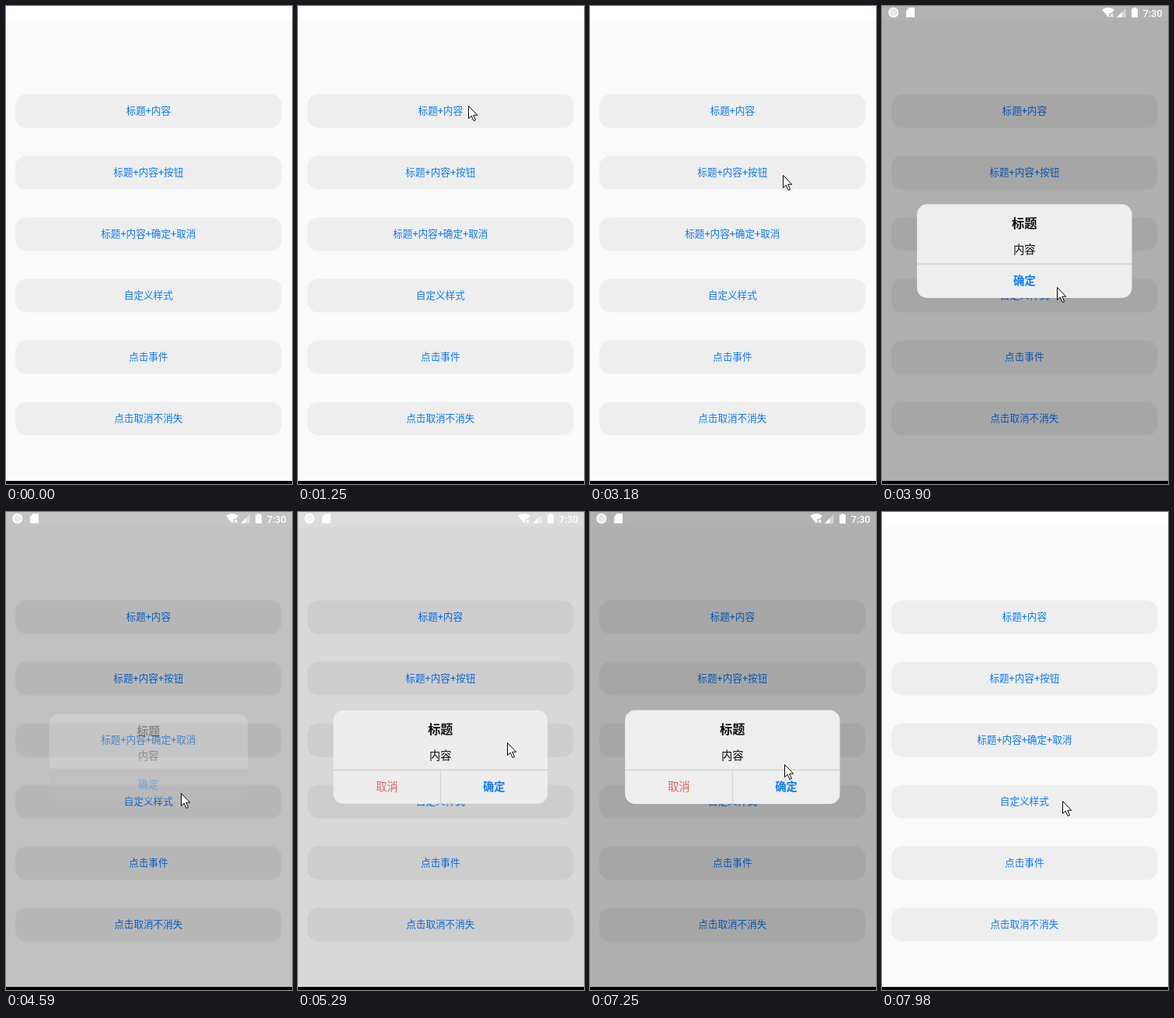
Write an HTML page with a canvas that moves like this. It is 368x614 px and loops after 8 s.

```html
<!DOCTYPE html>
<html lang="zh-CN">
<head>
<meta charset="utf-8">
<style>
  html, body { margin: 0; width: 100%; height: 100%; overflow: hidden; background: #fafafa; }
  canvas { display: block; width: 368px; height: 614px; }
</style>
</head>
<body>
<canvas id="stage"></canvas>
<script>
const W = 368, H = 614, LOOP = 8000, CX = 183.3, CY = 314.8;
const PRESS = 130, DIM = 0.3, DIM_TIME = 235, SCALE_TIME = 220, FADE_TIME = 150;
const FONT = 'Roboto, "Noto Sans CJK SC", "Noto Sans CJK", sans-serif';
const BLUE = '#0a7aff', RED = '#e0665c', INK = '#0c0c0c';
const LABELS = ['标题+内容', '标题+内容+按钮', '标题+内容+确定+取消', '自定义样式', '点击事件', '点击取消不消失'];

const dialog = (open, close, hit, ...actions) => ({ open, close, hit, actions });
const DIALOGS = [
  dialog(1255, 2335),
  dialog(3345, 4537, '确定', '确定'),
  dialog(5184, 5900, '取消', '取消', '确定'),
  dialog(6695, 7630, '确定', '取消', '确定')
];

// The pointer rests between moves
const move = (from, to, x, y) => ({ from, to, x, y });
const MOVES = [
  move(0, 50, 353, 614),
  move(50, 160, 340, 439),
  move(360, 1010, 219, 128),
  move(1890, 2260, 213, 424),
  move(2340, 2680, 225, 389),
  move(2700, 3170, 248, 217),
  move(3600, 3900, 225, 361),
  move(4970, 5140, 269, 296),
  move(5420, 5740, 112, 350),
  move(6110, 6370, 248, 282),
  move(6930, 7480, 252, 349),
  move(7640, 7970, 232, 371)
];

const ARROW = new Path2D('M0 0V16L3.7 12.6L6.6 19L9 18L6.2 11.7H11.2Z');
const CARD = new Path2D('M35 2h7v12.5h-11v-8.5z');
const WIFI = new Path2D('M291 14.5L283 4.8Q291 -.8 299 4.8L295.8 8.7H292.2V13z');
const CROSS = new Path2D('M293.5 10l4 4m0 -4l-4 4');

const dpr = window.devicePixelRatio || 1;
const stage = document.getElementById('stage');
const layer = document.createElement('canvas');
for (const c of [stage, layer]) {
  c.width = W * dpr;
  c.height = H * dpr;
}
const g = stage.getContext('2d'), lg = layer.getContext('2d');

const clamp = v => Math.max(0, Math.min(1, v));
const decelerate = (v, power) => 1 - Math.pow(1 - clamp(v), power);
const smooth = v => v * v * (3 - 2 * v);

function rect(c, x, y, w, h, color) {
  c.fillStyle = color;
  c.fillRect(x, y, w, h);
}

function card(c, x, y, w, h, r, color) {
  c.beginPath();
  c.roundRect(x, y, w, h, r);
  c.fillStyle = color;
  c.fill();
}

function circle(x, y, r) {
  g.beginPath();
  g.arc(x, y, r, 0, 7);
}

function signal(size) {
  g.beginPath();
  g.moveTo(302, 14.5);
  g.lineTo(302 + size, 14.5 - size);
  g.lineTo(302 + size, 14.5);
  g.fill();
}

// Text centred on x, with its middle at y
function label(c, text, x, y, size, color, weight = 400) {
  c.font = `${weight} ${size}px ${FONT}`;
  c.textAlign = 'center';
  c.fillStyle = color;
  c.fillText(text, x, y + size * 0.35);
}

function drawPage() {
  rect(g, 0, 0, W, H, '#fafafa');
  rect(g, 0, 0, W, 19, '#fff');
  LABELS.forEach((text, i) => {
    const y = 135 + i * 79;
    card(g, 12, y - 21.5, 342.5, 43, 14, '#eee');
    label(g, text, CX, y, 12.6, BLUE);
  });
}

function drawStatus() {
  g.fillStyle = g.strokeStyle = '#fff';
  g.lineWidth = 2.2;
  circle(14.8, 8.3, 5.4);
  g.stroke();
  g.globalAlpha = 0.7;
  circle(14.8, 8.3, 4);
  g.fill();
  g.globalAlpha = 0.45;
  signal(11.5);
  g.globalAlpha = 1;
  signal(6.5);
  g.fill(CARD);
  g.fill(WIFI);
  g.lineWidth = 1.1;
  g.stroke(CROSS);
  card(g, 321, 3.3, 8, 11.4, 0.8, '#fff');
  g.fillRect(323.2, 2, 3.6, 2);
  label(g, '7:30', 348.2, 9.2, 12.6, '#fff', 500);
}

function drawDialog(d, t, scale, alpha) {
  const n = d.actions.length, w = 276.5, h = n ? 120.4 : 76.4;
  const x = CX - w / 2, y = CY - h / 2, bar = y + 76.2, cell = w / n;
  const c = lg;
  c.setTransform(dpr, 0, 0, dpr, 0, 0);
  c.clearRect(0, 0, W, H);
  c.save();
  c.translate(CX, CY);
  c.scale(scale, scale);
  c.translate(-CX, -CY);
  card(c, x, y, w, h, 13, '#eee');
  c.clip();
  label(c, '标题', CX, y + 24.5, 16.2, INK, 700);
  label(c, '内容', CX, y + 58.3, 14.3, INK);
  d.actions.forEach((text, i) => {
    const left = x + i * cell, cancel = text === '取消';
    if (text === d.hit && t >= d.close - PRESS) rect(c, left, bar, cell, h, '#bec2be');
    label(c, text, left + cell / 2, y + 98.6, 14.3, cancel ? RED : BLUE, cancel ? 400 : 700);
    if (i) rect(c, left - 0.4, bar, 0.8, h, '#ccc');
  });
  if (n) rect(c, x, bar, w, 1, '#c8c8c8');
  c.restore();

  g.globalAlpha = alpha;
  g.drawImage(layer, 0, 0, W, H);
  g.globalAlpha = 1;
}

function drawPointer(t) {
  let x = 0, y = 0;
  for (const m of MOVES) {
    const k = smooth(clamp((t - m.from) / (m.to - m.from)));
    x += (m.x - x) * k;
    y += (m.y - y) * k;
  }
  if (t < MOVES[0].to) return;
  g.save();
  g.translate(Math.round(x) + 0.5, Math.round(y) + 0.5);
  g.fillStyle = '#fff';
  g.strokeStyle = '#000';
  g.lineWidth = 1;
  g.fill(ARROW);
  g.stroke(ARROW);
  g.restore();
}

function draw(t) {
  g.setTransform(dpr, 0, 0, dpr, 0, 0);
  drawPage();
  const d = DIALOGS.find(d => t >= d.open && t < d.close + DIM_TIME);
  if (d) {
    const closing = t >= d.close;
    const age = t - (closing ? d.close : d.open);
    const shown = v => closing ? 1 - v : v;
    const dim = DIM * shown(clamp(age / DIM_TIME));
    const scale = 0.9 + 0.1 * shown(decelerate(age / SCALE_TIME, 5));
    const alpha = shown(decelerate(age / FADE_TIME, 3));
    rect(g, 0, 0, W, H, `rgba(0,0,0,${dim})`);
    drawStatus();
    drawDialog(d, t, scale, alpha);
  }
  rect(g, 0, 610, W, 4, '#000');
  drawPointer(t);
}

const start = performance.now();
function tick() {
  draw((performance.now() - start) % LOOP);
  requestAnimationFrame(tick);
}
tick();
</script>
</body>
</html>
```
